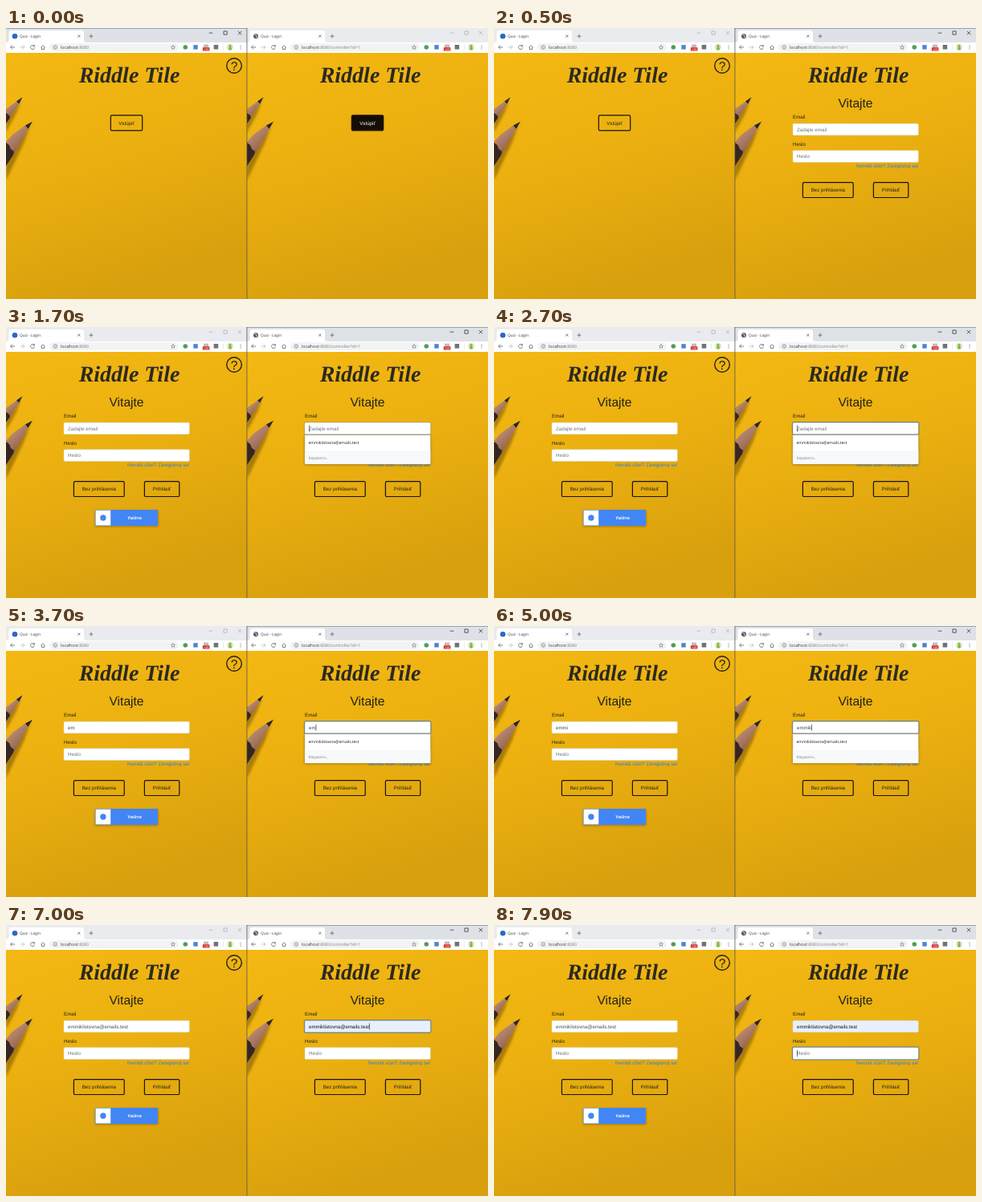
Animation of 600x338 px, one loop 8000 ms. Source, as an HTML page:

```html
<!DOCTYPE html>
<html lang="sk">
<head>
<meta charset="utf-8">
<title>Quiz - Login</title>
<style>
  html, body { margin: 0; width: 100%; height: 100%; overflow: hidden; background: #e8ae10; }
  svg { display: block; width: 100vw; height: 100vh; }
  text { white-space: pre; text-rendering: geometricPrecision; }
  .page { font-family: "Liberation Sans", Arial, sans-serif; font-size: 6.2px; fill: #212118; }
  .ui { font-family: "Open Sans", "Noto Sans", sans-serif; font-size: 5.2px; fill: #33363a; }
  .logo { font: italic bold 28px "Liberation Serif", serif; fill: #2b2923; }
  .mid { text-anchor: middle; }
  .line { fill: none; stroke: #5f6368; stroke-width: .8; }
  .btn { fill: none; stroke: #17130a; stroke-width: 1.2; }
  .ring { fill: none; stroke: #4c6f8f; }
</style>
</head>
<body>
<svg id="stage" viewBox="0 0 600 338" preserveAspectRatio="none"></svg>
<script>
const LOOP = 8000, STEP = 100;
const BRAND = "Riddle Tile";
const MAIL = "emmiklistovna@emails.test";
const HINT = "Zadajte email";
const KEYS = [3400, 3600, 4400, 4600, 5000];   // one letter per key press
const FOCUS = 1700, PICK = 7000, PASSWORD = 7700, LAG = 100;

const rect = (x, y, w, h, extra = "") =>
  `<rect x="${x}" y="${y}" width="${w}" height="${h}" ${extra}/>`;
const dot = (x, y, r, fill) => `<circle cx="${x}" cy="${y}" r="${r}" fill="${fill}"/>`;
const label = (x, y, str, extra = "") => `<text x="${x}" y="${y}" ${extra}>${str}</text>`;
const path = (d, extra) => `<path d="${d}" ${extra}/>`;
const poly = (points, fill) => `<polygon points="${points}" fill="${fill}"/>`;

const defs = `<defs>
  <linearGradient id="paper" x1="0" y1="0" x2=".3" y2="1">
    <stop offset="0" stop-color="#f3b812"/><stop offset=".45" stop-color="#ecb110"/>
    <stop offset="1" stop-color="#d9a00e"/>
  </linearGradient>
  <linearGradient id="wood" x1=".2" y1="0" x2=".7" y2="1">
    <stop offset="0" stop-color="#c99c7c"/><stop offset=".5" stop-color="#a0705a"/>
    <stop offset="1" stop-color="#57372b"/>
  </linearGradient>
  <filter id="soft" x="-30%" y="-30%" width="160%" height="160%">
    <feGaussianBlur stdDeviation="1.6"/>
  </filter>
  <clipPath id="pane"><rect width="300" height="338"/></clipPath>
</defs>`;

const pencils =
  `<g filter="url(#soft)" opacity=".5">` +
    poly("0,116 19,89 13,106 0,130", "#6b4700") +
    poly("0,164 31,120 22,144 0,190", "#6b4700") + `</g>` +
  poly("0,101 14,91 16.5,94 11,102 0,119", "url(#wood)") +
  poly("0,106 4,109 5,112 0,119", "#332622") +
  poly("20.5,86.2 13,91.6 16.3,94.6", "#292523") +
  poly("0,142 8,133 24.5,121 28,125 10,157 0,172", "url(#wood)") +
  poly("0,143 4,146 6,151 10,154 9,158 0,172", "#352621") +
  poly("33,116.7 24,121.4 27.6,125.8", "#292523");

const toolbar = () =>
  rect(0, 18, 300, 13, `fill="#fff"`) +
  path("M11 24H5.5M8 21.5L5.5 24L8 26.5M35.1 22.6A2.5 2.5 0 1 0 35.5 24.6M35.4 21V23H33.4M43.4 24.2L46 21.7L48.6 24.2M44.3 23.6V26.5H47.7V23.6", `class="line"`) +
  path("M17.5 24H23M20.5 21.5L23 24L20.5 26.5", `class="line" style="stroke:#bbbec2"`) +
  rect(54, 19.3, 161, 9.6, `rx="4.8" fill="#f1f3f4"`) +
  `<circle cx="61.3" cy="24" r="2.3" class="line" style="stroke-width:.6"/>` +
  path("M61.3 23.7V25.3M61.3 22.6V23.1", `class="line" style="stroke-width:.6"`) +
  path("M208 21.4L208.8 23.2L210.6 23.4L209.2 24.6L209.7 26.4L208 25.4L206.3 26.4L206.8 24.6L205.4 23.4L207.2 23.2Z", `class="line" style="stroke-width:.55"`) +
  dot(223.3, 24, 2.8, "#4f9e58") +
  rect(233.3, 21.2, 5.4, 5.4, `fill="#4b83d8"`) +
  rect(246, 20.6, 6, 4, `fill="#c9b9b6"`) +
  rect(244.8, 24.2, 8.6, 4.4, `rx=".6" fill="#d8322b"`) +
  label(249.1, 27.8, "+26", `class="ui mid" style="font-size:3.7px;fill:#fff"`) +
  rect(258.6, 21, 5.6, 5.6, `fill="#707479"`) +
  rect(270, 20.5, .5, 7, `fill="#d5d7da"`) +
  dot(279, 24, 4.2, "#dfe9d0") + dot(279, 22.3, 1.6, "#86b83c") +
  rect(277.2, 23.6, 3.6, 3.8, `rx="1.2" fill="#86b83c"`) +
  [22, 24, 26].map(y => dot(292, y, .6, "#5f6368")).join("");

const titleBar = (id, favicon) =>
  rect(0, 0, 300, 18, `id="${id}bar"`) +
  path("M0 18Q3.5 18 3.5 14.5V6Q3.5 3 6.5 3H94Q97 3 97 6V14.5Q97 18 100 18Z", `fill="#fff"`) +
  favicon +
  label(17, 12.1, "Quiz - Login", `class="ui" style="font-size:4.75px"`) +
  path("M89.3 8.7L92.3 11.7M92.3 8.7L89.3 11.7M103.6 10.2H108.4M106 7.8V12.6", `class="line"`) +
  path("M252.7 6.2H257.3M271 4H275.2V8.2H271ZM288.8 4L293.2 8.4M293.2 4L288.8 8.4", `id="${id}ctl" fill="none" stroke-width=".7"`);

const field = (id, y, hint) =>
  rect(72, y, 156.3, 14.6, `id="${id}ring" class="ring" rx="1.8" stroke-width="2.4" opacity="0"`) +
  rect(72, y, 156.3, 14.6, `id="${id}box" rx="1.4" fill="#fff" stroke="#ced4da" stroke-width=".4"`) +
  label(77, y + 9.6, hint, `id="${id}" fill="#6c757d"`);

const button = (x, y, w, str) =>
  rect(x, y, w, 18.9, `class="btn" rx="1.6"`) +
  label(x + w / 2, y + 11.7, str, `class="mid"`);

const form = (id, more) => `<g id="${id}form">` +
  label(150, 99, "Vitajte", `class="mid" style="font-size:15.6px"`) +
  label(72, 113, "Email") + field(id + "mail", 119.2, HINT) +
  label(72, 147, "Heslo") + field(id + "pass", 152.8, "Heslo") +
  label(228.4, 174.4, "Nemáš účet? Zaregistruj sa!", `text-anchor="end" fill="#2c7ee0"`) +
  button(84.4, 192.6, 62.8, "Bez prihlásenia") +
  button(172.4, 192.6, 43.4, "Prihlásiť") + more + `</g>`;

const signIn =
  rect(111, 229, 78.4, 20, `fill="#5c4300" opacity=".45" filter="url(#soft)"`) +
  rect(111, 228, 78, 20, `rx=".6" fill="#4285f4"`) +
  rect(111.6, 228.6, 18.6, 18.8, `fill="#fff"`) +
  dot(120.9, 238, 3.7, "#4285f4") +
  label(160, 240.1, "Увійти", `class="mid" style="font:500 5.7px Roboto,sans-serif;fill:#fff"`);

const help =
  `<circle cx="284" cy="47" r="9.3" fill="none" stroke="#26231b" stroke-width="1.4"/>` +
  label(284, 52.6, "?", `class="mid" style="font-size:15.5px"`);

const suggestions = `<g id="list">` +
  rect(71.6, 135, 157, 37, `fill="#4a3600" opacity=".45" filter="url(#soft)"`) +
  rect(72, 134.6, 156.3, 36.4, `rx=".8" fill="#fff" stroke="#b9b9b4" stroke-width=".4"`) +
  rect(72.2, 156, 155.9, 14.8, `fill="#f8f9fa"`) +
  rect(72.2, 155.7, 155.9, .4, `fill="#e2e4e7"`) +
  rect(72, 134, 156.3, .6, `fill="#7c8388"`) +
  label(76.6, 146.3, MAIL, `class="ui" style="font-size:4.95px;fill:#151515"`) +
  label(76.6, 164.7, "Керувати...", `class="ui" style="font-size:4.7px;fill:#7d8287"`) + `</g>`;

function pane(id, x, favicon, url, more, extra) {
  return `<g transform="translate(${x})" clip-path="url(#pane)">` +
    rect(0, 31, 300, 307, `fill="url(#paper)"`) + pencils +
    titleBar(id, favicon) + toolbar() +
    label(68, 25.9, `localhost<tspan fill="#7a7e83">${url}</tspan>`, `class="ui"`) +
    label(153.5, 68, BRAND, `class="logo mid"`) +
    `<g class="page"><g id="${id}enter">` + button(130.3, 108.9, 39.4, "Vstúpiť") + `</g>` +
    form(id, more) + extra + `</g>` +
    rect(0, 0, 300, .6, `id="${id}edge" fill="#5f7f9c"`) + `</g>`;
}

const globe = dot(11, 10.2, 3, "#4d5156") +
  path("M9 9.2Q11 8 12 9.4T10.6 11.4M11.8 12.3L13.2 10.8", `fill="none" stroke="#e8eaed" stroke-width=".8"`);

document.getElementById("stage").innerHTML = defs +
  pane("l", 0, dot(11, 10.2, 3.3, "#2b66c4"), ":8080", signIn, help) +
  pane("r", 300, globe, ":8080/controller?id=1", "",
    suggestions + rect(77, 0, .6, 8, `id="caret" fill="#16181a"`)) +
  rect(299.4, 0, 1, 338, `fill="#4f5348" opacity=".75"`);

const el = {};
document.querySelectorAll("[id]").forEach(n => el[n.id] = n);
const set = (id, name, value) => el[id].setAttribute(name, value);
const show = (id, on) => set(id, "display", on ? "inline" : "none");
const clamp = v => Math.max(0, Math.min(1, v));

set("renter", "style", "fill:#fff");
el.renter.querySelector("rect").style.fill = "#160e06";

function activate(id, on) {
  set(id + "bar", "fill", on ? "#dee1e6" : "#e9ebee");
  set(id + "ctl", "stroke", on ? "#222" : "#a8abaf");
  show(id + "edge", on);
}

const typed = t => t >= PICK ? MAIL : MAIL.slice(0, KEYS.filter(k => k <= t).length);

function fill(id, value) {
  el[id].textContent = value || HINT;
  set(id, "fill", value ? "#495057" : "#6c757d");
}

function render(ms) {
  const t = Math.floor(ms % LOOP / STEP) * STEP;
  activate("l", t < 400);
  activate("r", t >= 400);
  for (const [id, start] of [["l", 600], ["r", 500]]) {
    show(id + "enter", t < start);
    show(id + "form", t >= start);
  }

  const value = typed(t), picked = t >= PICK, onPass = t >= PASSWORD;
  fill("lmail", picked ? MAIL : typed(t - LAG));
  fill("rmail", value);
  if (picked) set("rmail", "fill", "#111");
  set("rmailbox", "fill", picked ? "#e8f0fe" : "#fff");

  const fadeIn = start => clamp((t - start + 50) / 150);
  const pass = onPass ? fadeIn(PASSWORD) : 0;
  const mail = t < FOCUS ? 0 : fadeIn(FOCUS) * (1 - pass);
  set("rmailring", "opacity", mail * .75);
  set("rpassring", "opacity", pass * .75);
  set("rmailbox", "stroke", mail > .5 ? "#7fa9d2" : "#ced4da");
  set("rpassbox", "stroke", pass > .5 ? "#7fa9d2" : "#ced4da");
  show("list", t >= FOCUS && !picked);

  const since = Math.max(...[FOCUS, ...KEYS, PICK, PASSWORD].filter(k => k <= t));
  show("caret", t >= FOCUS && (t - since) % 1000 < 500);
  const advance = value && !onPass ? el.rmail.getComputedTextLength() : 0;
  set("caret", "x", 77 + advance);
  set("caret", "y", onPass ? 156.2 : 122.6);
}

const begin = performance.now();
function tick() {
  render(performance.now() - begin);
  requestAnimationFrame(tick);
}
tick();
</script>
</body>
</html>
```
